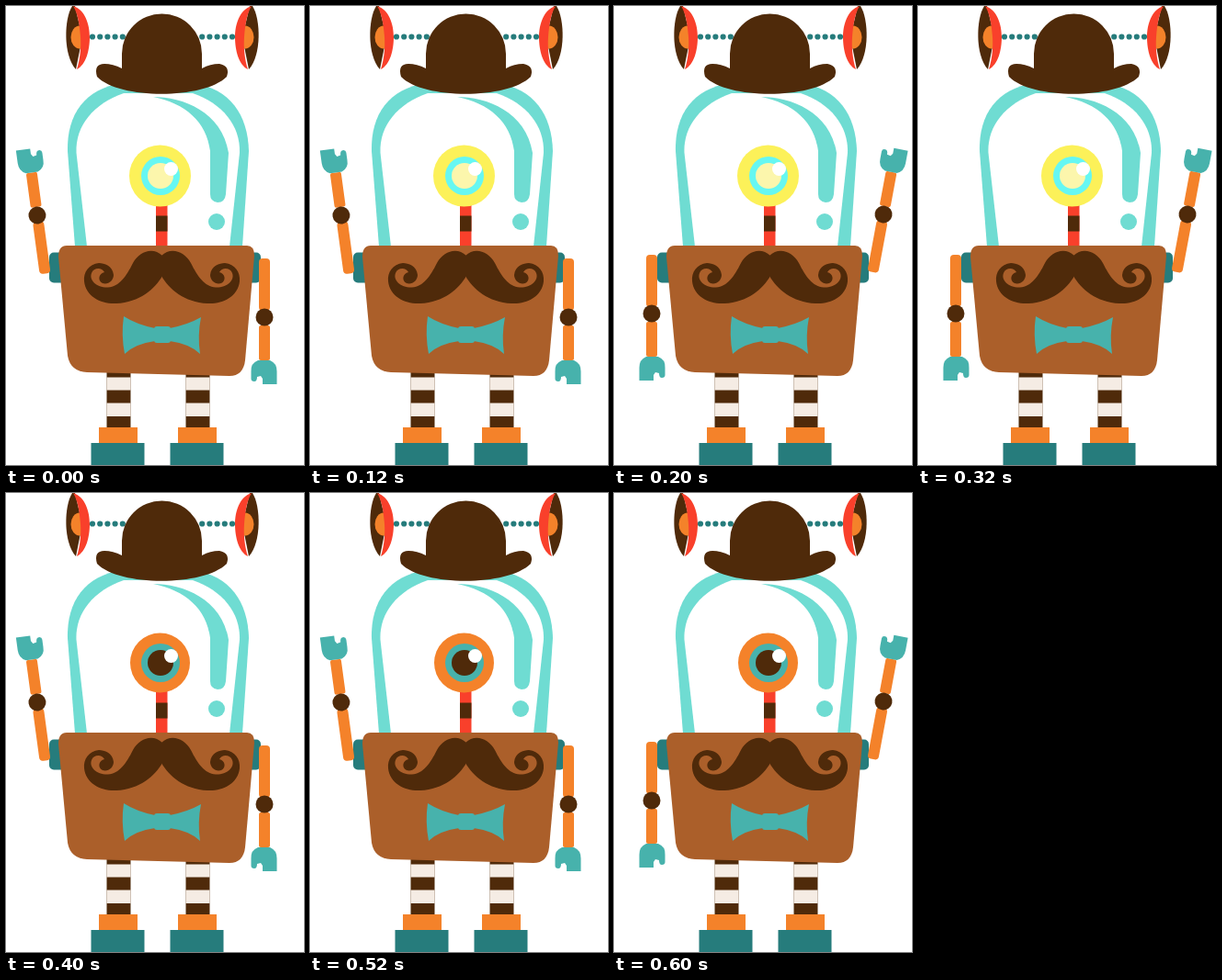
An HTML page for the animation above (800 ms loop, 324 by 500 pixels).

```html
<!DOCTYPE html>
<html lang="en">
<head>
<meta charset="utf-8">
<title>Waving robot</title>
<style>
  html, body { margin: 0; width: 100%; height: 100%; overflow: hidden; background: #fff; }
  svg { display: block; width: 100%; height: 100%; }
  .brown { fill: #4f2a0a; }
  .orange { fill: #f4822a; }
  .red { fill: #f9402b; }
  .deep { fill: #267c7c; }
  .teal { fill: #47b2ac; }
  .aqua { fill: #6fdcd2; }
  .cream { fill: #f5ece4; }
  .dots { stroke: #267c7c; stroke-width: 6.2; stroke-linecap: round; stroke-dasharray: 0 8.2; }
</style>
</head>
<body>
<svg viewBox="0 0 324 500">
  <defs>
    <!-- hanging left arm, elbow at the origin -->
    <g id="arm">
      <rect class="orange" x="-6" y="-64" width="12" height="57" rx="4"/>
      <rect class="orange" x="-6" y="9" width="12" height="38" rx="2"/>
      <circle class="brown" r="9.5"/>
      <path class="teal" d="M-6 47H7Q15 50 14.5 59V67Q14.5 70 11 70Q8 70 8 65L4 64L2 67V73H-13.5V59Q-13.5 50 -6 47Z"/>
    </g>
    <g id="antenna">
      <path class="dots" d="M94 33.5H128"/>
      <path class="brown" d="M72 0C63 14 62 54 76 69L83 34L75 0Z"/>
      <ellipse class="orange" cx="80" cy="34" rx="9.500" ry="12.500"/>
      <path class="red" d="M73 0C86 4 91 20 91 34C91 48 87 64 77 69C80 60 82 46 81 34C80 20 78 8 73 0Z"/>
    </g>
    <g id="leg">
      <rect class="brown" x="109.500" y="396" width="26" height="64"/>
      <path class="cream" d="M109.500 404.500h26v14h-26zM109.500 432.500h26v14.500h-26z"/>
      <rect class="orange" x="101" y="459" width="42" height="18"/>
      <rect class="deep" x="92.500" y="476" width="58" height="24"/>
    </g>
    <path id="whisker" class="brown" d="M170 272C160 262 145 267 138 280C131 294 123 306 111 306.500C99 307 90 299 93 291C95 285 104 284 107 290C101 291 99 299 105 302C111 304 117 299 117 293C116 283 107 280 101 280C90 281 84 290 85 300C87 317 104 325 120 324C145 323 162 308 170 294Z"/>
  </defs>

  <use href="#antenna"/>
  <use href="#antenna" transform="translate(340) scale(-1 1)"/>

  <path class="aqua" d="M75 262L67 158C66 118 86 90 126 84H204C243 90 263 118 264 158L257 262Z"/>
  <path fill="#fff" d="M88 262L76.500 160C75 130 96 106 128 95H203C235 106 255 130 254 160L243 262Z"/>
  <path class="aqua" d="M160 99C192 99 235 115 242 160L239 205Q238 214 230 214Q222 213 222 205V158C218 126 195 106 160 99Z"/>
  <circle class="aqua" cx="229" cy="235" r="9"/>

  <path class="brown" d="M99 77Q95 63 107 63Q116 63 126 68V52A43.500 43.500 0 0 1 213 52V68Q222 63 232 63Q244 65 240 77C215 102 123 102 99 77Z"/>

  <rect class="red" x="163" y="215" width="12.500" height="48"/>
  <rect class="brown" x="163" y="228.500" width="12.500" height="17"/>
  <circle id="rim" cx="167.5" cy="185"/>
  <circle id="iris" cx="168" cy="185" r="21"/>
  <circle id="pupil" cx="168" cy="185" r="14"/>
  <circle cx="179.5" cy="177.5" r="7.5" fill="#fff"/>

  <use href="#leg"/>
  <use href="#leg" x="86"/>

  <rect class="deep" x="47" y="268.500" width="20" height="33" rx="5"/>
  <rect class="deep" x="257" y="268.500" width="20" height="33" rx="5"/>
  <use id="left" href="#arm"/>
  <use id="right" href="#arm"/>

  <path fill="#ab5f2a" d="M66 261H262Q270 261 270 272L260 386Q258 403 243 403L88 399Q70 398 67 381L57 273Q57 261 66 261Z"/>
  <use href="#whisker"/>
  <use href="#whisker" transform="translate(339) scale(-1 1)"/>
  <path class="teal" d="M128 338Q142 347 162 351V365Q140 368 129 379Q125 358 128 338ZM212 339Q198 347 178 351V365Q200 368 211 379Q208 359 212 339Z"/>
  <rect class="teal" x="161" y="349" width="18" height="18" rx="3"/>
</svg>
<script>
  const get = id => document.getElementById(id);
  const STEP = 200;
  const poses = {
    left: ["translate(41 335)", "translate(34 228) rotate(-7.7) scale(1 -1)"],
    right: ["translate(281 339) scale(-1 1)", "translate(293 227) rotate(10.5) scale(-1 -1)"]
  };
  const eyes = [
    { rim: "#fcf159", iris: "#66f7f2", pupil: "#fcf6ac", r: 33.5 },
    { rim: "#f4822a", iris: "#47b2ac", pupil: "#4f2a0a", r: 32.5 }
  ];

  function draw(time) {
    const step = Math.floor(time / STEP) % 4;
    const rightUp = step % 2;
    get("left").setAttribute("transform", poses.left[1 - rightUp]);
    get("right").setAttribute("transform", poses.right[rightUp]);
    const eye = eyes[step >> 1];
    for (const part of ["rim", "iris", "pupil"]) get(part).setAttribute("fill", eye[part]);
    get("rim").setAttribute("r", eye.r);
  }

  const start = performance.now();
  function tick() {
    draw(performance.now() - start);
    requestAnimationFrame(tick);
  }
  tick();
</script>
</body>
</html>
```
